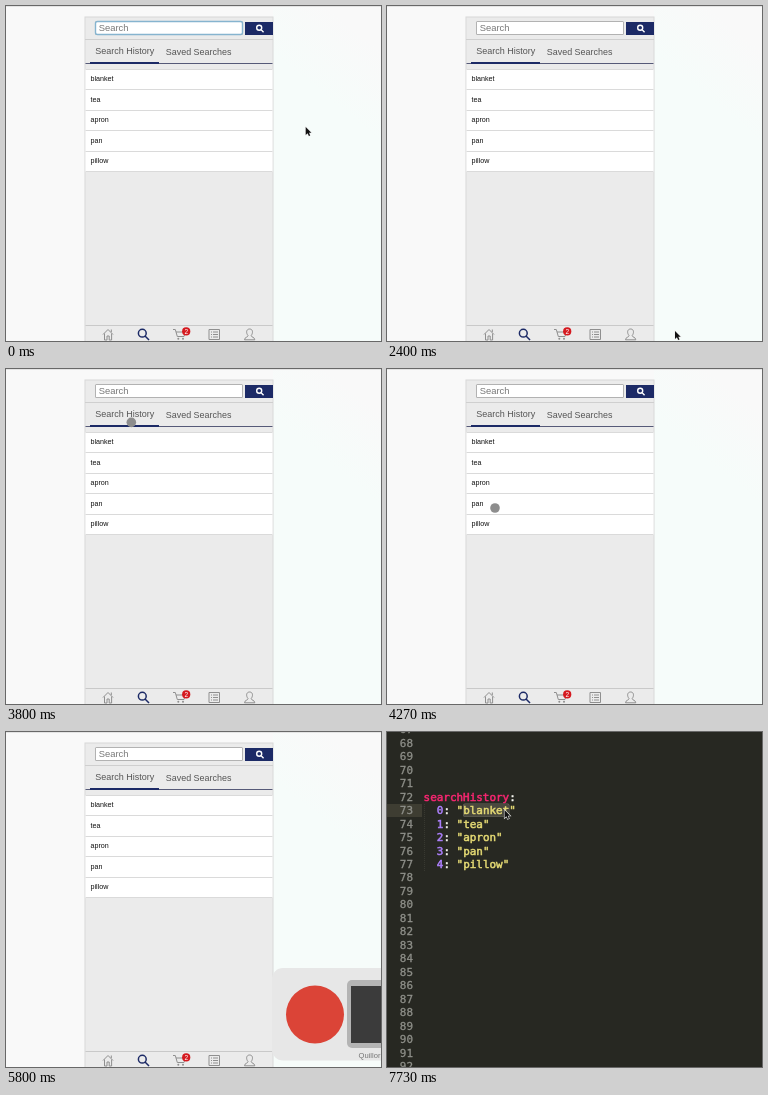
Write an HTML page with a canvas that moves like this. It is 375 px wide and 335 px high and loops after 8 s.

```html
<!DOCTYPE html>
<html lang="en">
<head>
<meta charset="utf-8">
<title>Search history</title>
<style>
html, body { margin: 0; width: 100%; height: 100%; overflow: hidden; background: #f9f9f9; }
canvas { display: block; width: 375px; height: 335px; }
</style>
</head>
<body>
<canvas id="stage" width="375" height="335"></canvas>
<script>
const W = 375, H = 335, LOOP = 8000, TICK = 200 / 3;
const g = document.getElementById('stage').getContext('2d');
const SANS = '"Liberation Sans", Arial, sans-serif';
const MONO = '"DejaVu Sans Mono", monospace';
const NAVY = '#1c2a66', PANEL = '#ebebeb', ICON = '#8f8f8f';
const words = ['blanket', 'tea', 'apron', 'pan', 'pillow'];

// Pointer paths as [tick, x, y]
const touchPath = [[50, 154.5, 132.5], [53, 146, 84], [56, 130, 47], [59, 116, 66], [62, 110, 110],
  [63, 108, 125], [64, 108, 139], [66, 122, 182], [69, 168, 256], [73, 222, 338]];
const peekPath = [[35, 291, 331], [36, 288, 325], [37, 288, 326], [39, 293, 334]];
const beamPath = [[100, 214, 326], [102, 186, 225], [104, 146, 125], [107, 121, 83], [114, 121, 83]];

function rect(x, y, w, h, color) {
  g.fillStyle = color;
  g.fillRect(x, y, w, h);
}

function round(x, y, w, h, r, color) {
  g.fillStyle = color;
  g.beginPath();
  g.roundRect(x, y, w, h, r);
  g.fill();
}

function disc(x, y, r, color) {
  g.fillStyle = color;
  g.beginPath();
  g.arc(x, y, r, 0, 7);
  g.fill();
}

// An outline width above zero thickens the letters
function text(s, x, y, size, color, font = SANS, bold = 0) {
  g.font = `${size}px ${font}`;
  g.fillStyle = color;
  g.fillText(s, x, y);
  if (!bold) return;
  g.strokeStyle = color;
  g.lineWidth = bold;
  g.strokeText(s, x, y);
}

function stroke(d, color, width) {
  g.strokeStyle = color;
  g.lineWidth = width;
  g.stroke(new Path2D(d));
}

function along(path, k) {
  if (k < path[0][0] || k >= path[path.length - 1][0]) return null;
  const i = path.findIndex(p => p[0] > k);
  const [a, b] = [path[i - 1], path[i]];
  const u = (k - a[0]) / (b[0] - a[0]);
  return [a[1] + (b[1] - a[1]) * u, a[2] + (b[2] - a[2]) * u];
}

function arrow(x, y) {
  const p = new Path2D('M0 0V8L1.9 6.3L3.2 9L4.5 8.4L3.3 5.8H5.7Z');
  g.save();
  g.translate(x, y);
  g.lineWidth = 1.1;
  g.strokeStyle = '#eee';
  g.stroke(p);
  g.fillStyle = '#111';
  g.fill(p);
  g.restore();
}

function lens(x, y, r, tail, color, width) {
  const c = r * 0.7;
  stroke(`M${x + r} ${y}A${r} ${r} 0 1 1 ${x - r} ${y}A${r} ${r} 0 1 1 ${x + r} ${y}` +
    `M${x + c} ${y + c}l${tail} ${tail}`, color, width);
}

function backdrop() {
  rect(0, 0, W, H, '#f9f9f9');
  const mint = g.createLinearGradient(300, 75, 345, 20);
  mint.addColorStop(0, '#f6fcfa');
  mint.addColorStop(1, '#f9f9f9');
  rect(267, 1, 108, 334, mint);
  rect(0, 0, W, 1, '#e4e4e4');
}

function searchBar(k) {
  rect(79, 33, 188, 1, '#cfcfcf');
  round(89, 15, 148, 14, 1.5, '#b2b2b2');
  rect(90, 16, 146, 12, '#fff');
  const glow = Math.max(0, Math.min(1, (18 - k) / 3));
  if (glow) {
    g.globalAlpha = glow;
    g.strokeStyle = '#86b4cf';
    g.lineWidth = 1.4;
    g.beginPath();
    g.roundRect(89.5, 15.5, 147, 13, 2);
    g.stroke();
    g.globalAlpha = 1;
  }
  text('Search', 92.8, 25, 9.4, '#777');
  if (k >= 3 && k < 10) rect(93, 18, 1, 10, '#333');
  rect(239, 16, 28, 13, NAVY);
  lens(253.2, 21.8, 2.5, 2.6, '#fff', 1.4);
}

function tabBar() {
  stroke('M97 328.5L102 323.5L107 328.5M98.5 327.5V334H101V330H103.2V334H105.6V327.5M105.3 326V323.5', ICON, 1);
  lens(136.3, 327.2, 3.9, 4, NAVY, 1.5);
  stroke('M167 323.5H169.3L171.3 330.5H178L179.3 326H170', ICON, 1);
  disc(172.3, 332.8, 1, ICON);
  disc(177, 332.8, 1, ICON);
  disc(180.2, 325.4, 4.1, '#d5191f');
  text('2', 178.4, 328, 6.6, '#fff');
  stroke('M203 323.5H213.5V333.5H203ZM205 326h1M207 326h5M205 328.5h1M207 328.5h5M205 331h1M207 331h5', ICON, 1);
  stroke('M238.5 333.8C238.5 331 242 331.5 242 329.5C239.8 327 240.2 323 243.6 323S247.2 327 245.2 329.5C245.2 331.5 248.8 331 248.8 333.8Z', ICON, 1);
}

function phone(k) {
  rect(78.5, 10.5, 189, 325, '#d8d8d8');
  rect(79.5, 11.5, 187, 324, PANEL);
  searchBar(k);
  text('Search History', 89.3, 48, 9, '#555');
  text('Saved Searches', 159.8, 49, 8.95, '#555');
  rect(79.5, 57, 187, 1, '#565a78');
  rect(84, 56, 69, 2, NAVY);
  rect(79.5, 63, 187, 103, '#fff');
  words.forEach((w, i) => {
    rect(79.5, Math.round(63 + i * 20.4), 187, 1, '#dadada');
    text(w, 84.5, 75.4 + i * 20.45, 7.15, '#111');
  });
  rect(79.5, 165, 187, 1, '#dadada');
  rect(79.5, 319, 187, 1, '#c9c9c9');
  tabBar();
}

function switcher() {
  round(266, 236, 130, 92.5, 11, '#e7e7e7');
  round(341, 248, 80, 68, 5, '#b4b4b4');
  disc(309, 282.5, 29, '#db4437');
  rect(345, 254, 58, 57, '#3b3b3b');
  text('Quillor Pad', 352.5, 325.6, 7.6, '#777');
}

function browser(k) {
  backdrop();
  phone(k);
  if (k < 1) arrow(299.7, 121);
  const peek = along(peekPath, k), dot = along(touchPath, k);
  if (peek) arrow(...peek);
  if (dot) disc(...dot, 4.8, '#8d8d8d');
  if (k >= 87) switcher();
}

const SIZE = 10.95, CHAR = SIZE * 0.602;
const lineY = n => Math.round(68.6 + (n - 72) * 13.48);

function code(parts, col, y) {
  let x = 36.6 + col * CHAR;
  for (const [s, color] of parts) {
    text(s, x, y, SIZE, color, MONO, 0.5);
    x += s.length * CHAR;
  }
}

function editor(k) {
  rect(0, 0, W, H, '#272822');
  if (k >= 109) rect(0, 72, 35, 13, '#3e3d32');
  if (k >= 114) {
    round(76, 71.5, 46.5, 13.5, 2, '#66655a');
    round(76.5, 72, 45.5, 12.5, 2, '#49483e');
  }
  for (let n = 67; n <= 92; n++) text(String(n), 12.8, lineY(n), SIZE, '#8f908a', MONO, 0.3);
  for (let y = 72; y < 139; y += 2) rect(37, y, 1, 1, '#383931');
  code([['searchHistory', '#f92672'], [':', '#f8f8f2']], 0, lineY(72));
  words.forEach((w, i) => code(
    [[String(i), '#ae81ff'], [': ', '#f8f8f2'], [`"${w}"`, '#e6db74']], 2, lineY(73 + i)));
  if (k >= 111 && k < 114) rect(122, 72, 1, 13, '#f8f8f0');
  const beam = along(beamPath, k);
  if (beam) {
    const [x, y] = beam;
    stroke(`M${x - 2} ${y - 6}L${x} ${y - 5}L${x + 2} ${y - 6}M${x} ${y - 5}V${y + 5}` +
      `M${x - 2} ${y + 6}L${x} ${y + 5}L${x + 2} ${y + 6}`, '#ddd', 1);
  }
  if (k >= 114) arrow(117.5, 78);
}

const start = performance.now();
function draw() {
  const t = (performance.now() - start) % LOOP;
  const k = Math.floor((t + 4) / TICK) % 120;
  if (k < 99) browser(k);
  else editor(k);
  requestAnimationFrame(draw);
}
draw();
</script>
</body>
</html>
```
